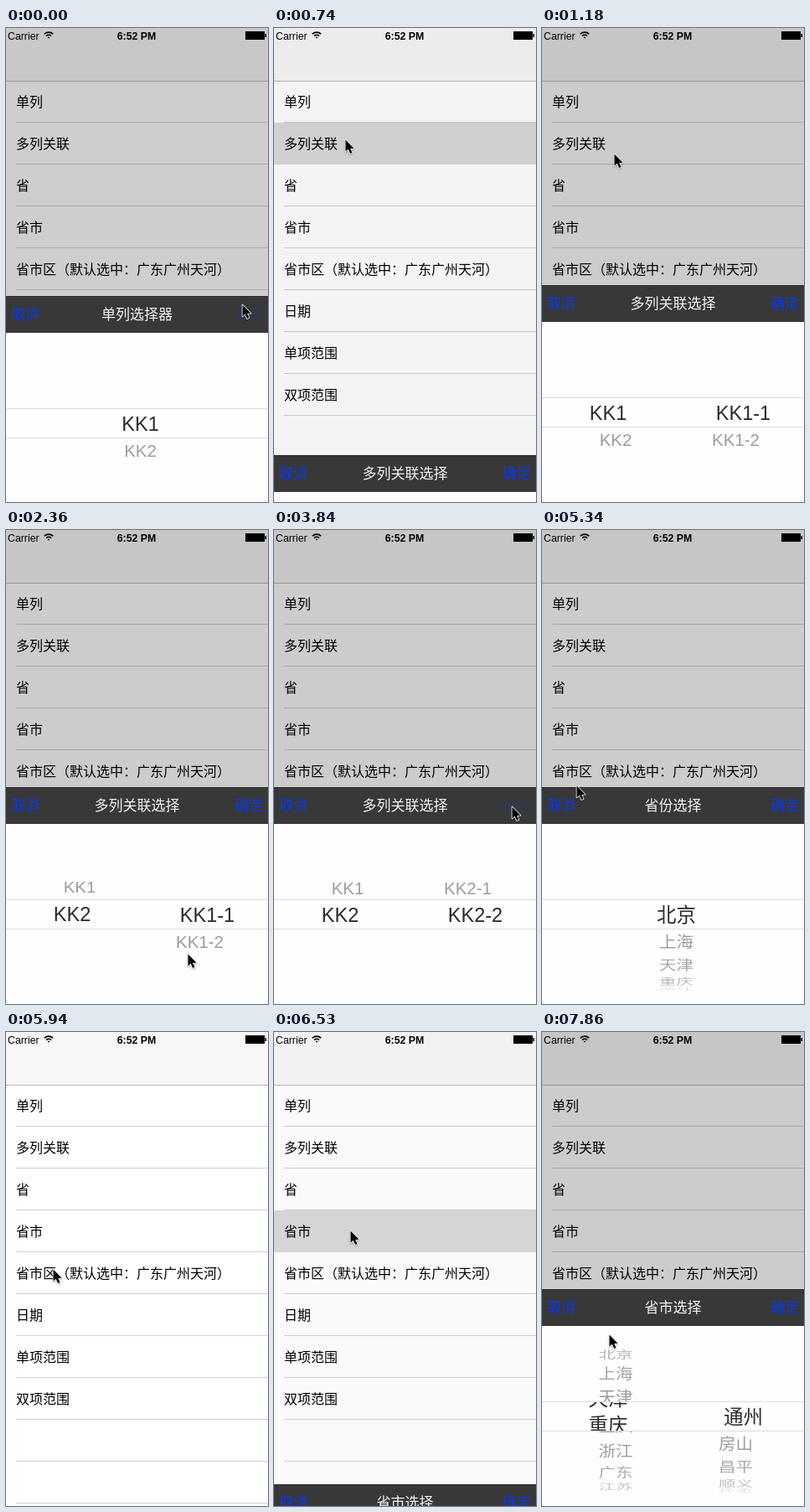
Write an HTML page with a canvas that moves like this. It is 313x566 px and loops after 8 s.

```html
<!DOCTYPE html>
<html lang="zh-CN">
<head>
<meta charset="utf-8">
<title>Picker demo</title>
<style>
html, body { margin: 0; width: 313px; height: 566px; overflow: hidden; background: #fff; }
canvas { display: block; }
</style>
</head>
<body>
<canvas id="stage" width="313" height="566"></canvas>
<script>
const W = 313, H = 566, LOOP = 8000, STEPS = 54;
const ctx = document.getElementById('stage').getContext('2d');
const FONT = '"Liberation Sans", "Noto Sans CJK SC", "Noto Sans CJK", "Noto Sans SC", sans-serif';
const SLIDE = 300, SHEET_H = 260, BOTTOM = 567, ANGLE = 0.372, RADIUS = 88;

const rows = ['单列', '多列关联', '省', '省市', '省市区（默认选中：广东广州天河）', '日期', '单项范围', '双项范围'];
const provinces = ['北京', '上海', '天津', '重庆', '浙江', '广东', '江苏', '福建'];
const districts = ['通州', '房山', '昌平', '顺义', '怀柔'];

// Tracks are [time, value...] points
const groupScroll = [[1700, 0], [1930, 0.6], [2220, 1.08], [2370, 1.045], [2500, 1]];
const itemScroll = [[2950, 0], [3260, 0.85], [3420, 1]];
const provinceScroll = [[7710, 0], [7850, 2.7]];
const pointer = [
  [0, 282, 330], [100, 280, 325], [300, 190, 225], [590, 85, 133], [1050, 85, 133],
  [1185, 86, 150], [1480, 80, 400], [1630, 78, 478], [1780, 78, 478], [2070, 80, 445],
  [2370, 217, 506], [2660, 217, 500], [2950, 219, 495], [3260, 225, 460], [3410, 232, 440],
  [3700, 284, 330], [4000, 284, 330], [4440, 88, 185], [5030, 88, 185], [5333, 41, 305],
  [5480, 22, 328], [5640, 22, 328], [6220, 91, 237], [7060, 91, 237], [7550, 80, 458],
  [7710, 80, 458], [7850, 80, 361]
];

const sheets = [
  { title: '单列选择器', row: 0, show: -2000, hide: -40, press: 1,
    columns: () => [[['KK1', 'KK2'], 0]] },
  { title: '多列关联选择', row: 1, show: 650, hide: 3960, press: 1,
    columns: t => {
      const group = t < 2600 ? 'KK1' : 'KK2';
      return [[['KK1', 'KK2'], track(groupScroll, t)], [[group + '-1', group + '-2'], track(itemScroll, t)]];
    } },
  { title: '省份选择', row: 2, show: 4670, hide: 5590, press: 0,
    columns: () => [[provinces, 0]] },
  { title: '省市选择', row: 3, show: 6459, hide: 9000, press: 1,
    columns: t => [[provinces, track(provinceScroll, t)], [districts, 0]] }
];

function track(points, t, axis = 1) {
  const i = points.findIndex(p => p[0] > t);
  if (i < 0) return points[points.length - 1][axis];
  if (i === 0) return points[0][axis];
  const a = points[i - 1], b = points[i];
  return a[axis] + (b[axis] - a[axis]) * (t - a[0]) / (b[0] - a[0]);
}

function ramp(t) {
  const x = Math.min(1, Math.max(0, t / SLIDE));
  return x * x * (3 - 2 * x);
}

function rect(x, y, w, h, color) {
  ctx.fillStyle = color;
  ctx.fillRect(x, y, w, h);
}

function text(str, x, y, size, color, align = 'left', weight = 400) {
  ctx.font = `${weight} ${size}px ${FONT}`;
  ctx.textAlign = align;
  ctx.fillStyle = color;
  ctx.fillText(str, x, y + size * 0.37);
}

function clipped(x, y, w, h, draw) {
  ctx.save();
  ctx.beginPath();
  ctx.rect(x, y, w, h);
  ctx.clip();
  draw();
  ctx.restore();
}

function statusBar() {
  text('Carrier', 2, 9.6, 12.3, '#000');
  text('6:52 PM', 156, 9.6, 12.3, '#000', 'center', 700);
  ctx.strokeStyle = '#000';
  ctx.lineWidth = 1.7;
  for (const r of [1, 4.2, 7.4]) {
    ctx.beginPath();
    ctx.arc(51, 12.5, r, -Math.PI * 0.75, -Math.PI * 0.25);
    ctx.stroke();
  }
  ctx.lineWidth = 1;
  ctx.strokeRect(286.5, 4.5, 22, 9);
  rect(287, 5, 21, 8, '#000');
  rect(309.5, 7, 1.5, 4, '#000');
}

function list(selected) {
  rect(0, 0, W, H, '#fff');
  rect(0, 0, W, 63, '#f7f7f7');
  rect(0, 63, W, 1, '#b9b9bb');
  for (let i = 0; i < 10; i++) rect(12, 112 + 50 * i, W, 1, '#d0cfd3');
  if (selected >= 0) rect(0, 113 + 50 * (selected - 1), W, 50, '#d9d9d9');
  rows.forEach((label, i) => text(label, 12, 88 + 50 * i, 16, '#000'));
  statusBar();
}

function drum(items, scroll, x, cy) {
  items.forEach((label, i) => {
    const a = (i - scroll) * ANGLE;
    if (Math.abs(a) > 1.53) return;
    ctx.save();
    ctx.translate(x, cy + RADIUS * Math.sin(a));
    ctx.scale(1, 0.15 + 0.85 * Math.cos(a));
    text(label, 0, 0, 20.5, `rgba(0,0,0,${0.4 * Math.sqrt(Math.cos(a))})`, 'center');
    ctx.restore();
  });
}

function wheel([items, scroll], lensX, drumX, top) {
  const cy = top + 152.5, bandTop = top + 134, bandBottom = top + 170;
  const drawDrum = () => drum(items, scroll, drumX, cy);
  clipped(0, top + 44, W, 90, drawDrum);
  clipped(0, bandBottom, W, 90, drawDrum);
  clipped(0, bandTop + 1, W, 34, () => items.forEach((label, i) =>
    text(label, lensX, cy + 32 * (i - scroll), 23.5, '#2b2b2b', 'center')));
}

function drawSheet(s, t, p) {
  const top = Math.round(BOTTOM - SHEET_H * p);
  rect(0, top, W, SHEET_H, '#fefefe');
  rect(0, top, W, 44, '#383838');
  rect(0, top, W, 1, '#2c2c2c');
  text(s.title, 156.5, top + 22, 17, '#f2f2f2', 'center');
  const pressed = t > s.hide - 150 && t < s.hide + 100;
  ['取消', '确定'].forEach((label, i) => {
    ctx.globalAlpha = pressed && s.press === i ? 0.2 : 1;
    text(label, i ? 273 : 6, top + 22, 17, '#0a38ee');
  });
  ctx.globalAlpha = 1;
  const columns = s.columns(t);
  if (columns.length === 1) {
    wheel(columns[0], 160.5, 160.5, top);
  } else {
    wheel(columns[0], 79, 88, top);
    wheel(columns[1], 240.5, 231.5, top);
  }
  rect(0, top + 134, W, 1, '#dcdcdc');
  rect(0, top + 169, W, 1, '#dcdcdc');
}

function drawPointer(x, y) {
  ctx.save();
  ctx.translate(Math.round(x) + 0.5, Math.round(y) + 0.5);
  ctx.beginPath();
  for (const [px, py] of [[0, 0], [0, 14], [3.2, 11.2], [5.6, 16.6], [8, 15.6], [5.7, 10.4], [10, 10.2]]) ctx.lineTo(px, py);
  ctx.closePath();
  ctx.lineJoin = 'round';
  ctx.shadowColor = 'rgba(0,0,0,.35)';
  ctx.shadowBlur = 2;
  ctx.shadowOffsetY = 1;
  ctx.strokeStyle = '#fff';
  ctx.lineWidth = 1.6;
  ctx.stroke();
  ctx.shadowColor = 'transparent';
  ctx.fillStyle = '#000';
  ctx.fill();
  ctx.restore();
}

function render(now) {
  const step = LOOP / STEPS;
  const t = Math.min(STEPS - 1, Math.floor(now % LOOP / step + 0.1)) * step;
  const level = s => ramp(t - s.show) - ramp(t - s.hide);
  const active = sheets.find(s => level(s) > 0);
  const rising = active && t < active.show + SLIDE;
  list(rising ? active.row : -1);
  if (active) {
    const p = level(active);
    rect(0, 0, W, H, `rgba(0,0,0,${0.2 * p})`);
    drawSheet(active, t, p);
  }
  drawPointer(track(pointer, t), track(pointer, t, 2));
}

const start = performance.now();
function tick() {
  render(performance.now() - start);
  requestAnimationFrame(tick);
}
tick();
</script>
</body>
</html>
```
